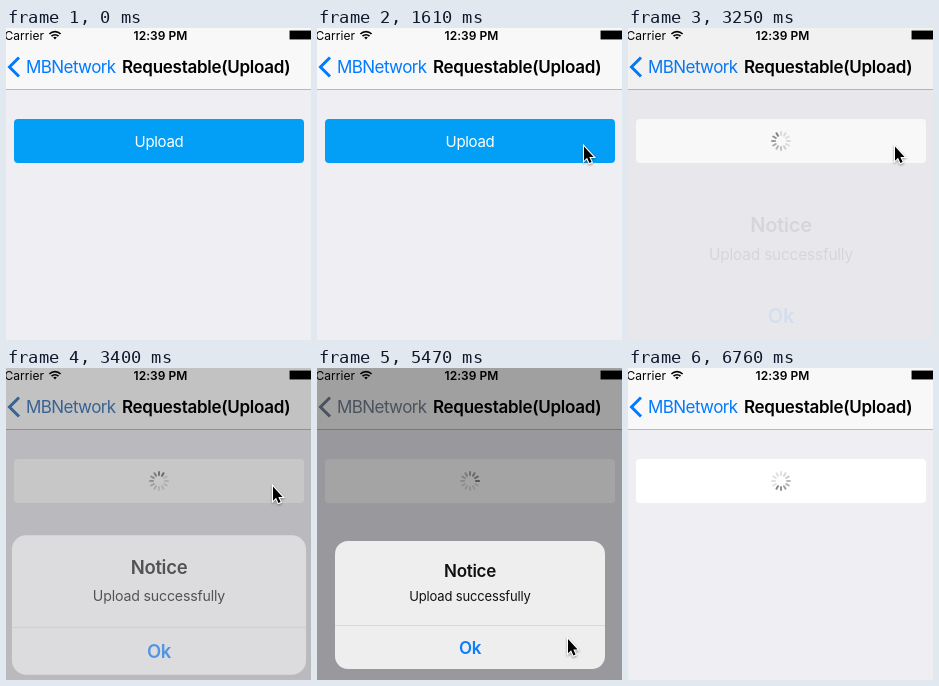
An HTML page that plays this animation: 305x312 px, repeating every 6.86 s.

```html
<!DOCTYPE html>
<html lang="en">
<head>
<meta charset="utf-8">
<title>Upload</title>
<style>
  html, body { margin: 0; width: 100%; height: 100%; overflow: hidden; background: #eeeef3; }
  svg { display: block; }
  text { font: 400 17px Inter, sans-serif; letter-spacing: -.58px; }
  .bold { font-weight: 600; letter-spacing: -.28px; }
  .mid { text-anchor: middle; }
  .status { font-size: 12px; letter-spacing: .05px; }
  .button { font-size: 15px; letter-spacing: -.3px; }
  .note { font-size: 13px; letter-spacing: -.16px; }
  #cursor { filter: drop-shadow(0 1px 1px #0006); }
</style>
</head>
<body>
<svg width="305" height="312" viewBox="0 0 305 312">
  <rect width="305" height="312" fill="#eeeef3"/>
  <rect width="305" height="61" fill="#f8f8f8"/>
  <rect y="61" width="305" height="1" fill="#b9b9bb"/>

  <text class="status" x="-1.5" y="11.5">Carrier</text>
  <g fill="none" stroke="#000" stroke-width="1.7">
    <path d="M43.4 6a8 8 0 0 1 11.2 0M45.5 8.2a5 5 0 0 1 7 0"/>
    <path d="M49 11.6l-1.8-2a2.6 2.6 0 0 1 3.6 0z" fill="#000" stroke="none"/>
  </g>
  <text class="status bold mid" x="154.5" y="11.5">12:39 PM</text>
  <rect x="283.5" y="2.5" width="25" height="9" rx="1" stroke="#8a8a8a"/>

  <g id="back">
    <path d="M13 29.5L3.5 39l9.5 9.5" fill="none" stroke="currentColor" stroke-width="3"/>
    <text x="20" y="45" fill="currentColor">MBNetwork</text>
  </g>
  <text class="bold" x="116" y="45">Requestable(Upload)</text>

  <g id="loading">
    <rect x="8" y="91" width="290" height="44" rx="4" fill="#fff"/>
    <g id="spinner" transform="translate(153 113)" stroke="#858585" stroke-width="2" stroke-linecap="round"></g>
  </g>
  <g id="button">
    <rect x="8" y="91" width="290" height="44" rx="4" fill="#039ff7"/>
    <text class="button mid" x="153" y="118.5" fill="#fff">Upload</text>
  </g>

  <rect id="dim" width="305" height="312"/>
  <g id="alert">
    <rect x="18" y="173" width="270" height="128" rx="13" fill="#f9f9f9"/>
    <rect x="18" y="257" width="270" height="1" fill="#e0e0e3"/>
    <text class="bold mid" x="153" y="209">Notice</text>
    <text class="note mid" x="153" y="233">Upload successfully</text>
    <text class="bold mid" x="153" y="286" fill="#007aff">Ok</text>
  </g>
  <path id="cursor" d="M0-.5v14.2l3.1-3 2.3 5.4 2.2-1-2.3-5.1h4.3z" stroke="#fff" stroke-width="2.2" paint-order="stroke"/>
</svg>
<script>
const LOOP = 6860;
const $ = id => document.getElementById(id);
const clamp = x => Math.min(1, Math.max(0, x));
const ramp = (t, a, b) => clamp((t - a) / (b - a));
const smooth = (t, a, b) => { const p = ramp(t, a, b); return p * p * (3 - 2 * p); };
const mix = (a, b, p) => a + (b - a) * p;

// The screen refreshes in bursts: start, end, number of intervals.
const bursts = [[0, 300, 1], [590, 1610, 7], [2810, 3850, 7], [4000, 5030, 7], [5180, 6220, 7], [6360, 6760, 2]];
function snap(t) {
  const [a, b, n] = bursts.findLast(run => run[0] <= t);
  return a + Math.min(n, Math.floor((t - a) / (b - a) * n + .06)) * (b - a) / n;
}

function bezier(p, a, b, c, d) {
  const q = 1 - p;
  return q * q * q * a + 3 * q * q * p * b + 3 * q * p * p * c + p * p * p * d;
}

// Pointer moves: start, end, x control points, y control points.
const moves = [
  [440, 1610, [281, 310, 225, 267], [311, 250, 119, 119]],
  [4130, 5030, [267, 290, 300, 251], [119, 119, 270, 271.5]],
  [6300, 6760, [251, 264, 277, 290], [271.5, 286, 301, 316]]
];
function pointer(t) {
  const [a, b, xs, ys] = moves.findLast(m => m[0] <= t) || moves[0];
  const p = ramp(t, a, b);
  return [bezier(p, ...xs), bezier(p, ...ys)];
}

const spokes = Array.from({ length: 12 }, (_, i) => {
  const line = document.createElementNS('http://www.w3.org/2000/svg', 'path');
  line.setAttribute('d', 'M0-6V-9');
  line.setAttribute('transform', `rotate(${i * 30})`);
  return $('spinner').appendChild(line);
});

function draw(t) {
  const loading = smooth(t, 2760, 3000);
  $('loading').style.opacity = loading > 0 ? 1 : 0;
  $('button').style.opacity = 1 - loading;
  const head = Math.floor(12 * (t - 3250) / 957 + 11.8);
  spokes.forEach((line, i) => {
    const age = ((head - i) % 12 + 12) % 12;
    line.style.opacity = Math.max(.25, 1 - age * .11);
  });

  const shown = smooth(t, 3190, 3590), hidden = smooth(t, 5424, 5680);
  const alpha = shown * (1 - hidden);
  $('dim').style.opacity = .4 * alpha;
  $('alert').style.opacity = alpha;
  $('alert').setAttribute('transform', `translate(153 237) scale(${mix(1.2, 1, shown)}) translate(-153 -237)`);
  $('back').style.color = `rgb(${mix(0, 128, alpha)}, ${mix(122, 128, alpha)}, ${mix(255, 132, alpha)})`;

  $('cursor').style.opacity = t < 300 ? 0 : 1;
  $('cursor').setAttribute('transform', `translate(${pointer(t)})`);
}

const start = performance.now();
function frame() {
  draw(snap((performance.now() - start) % LOOP));
  requestAnimationFrame(frame);
}
frame();
</script>
</body>
</html>
```
